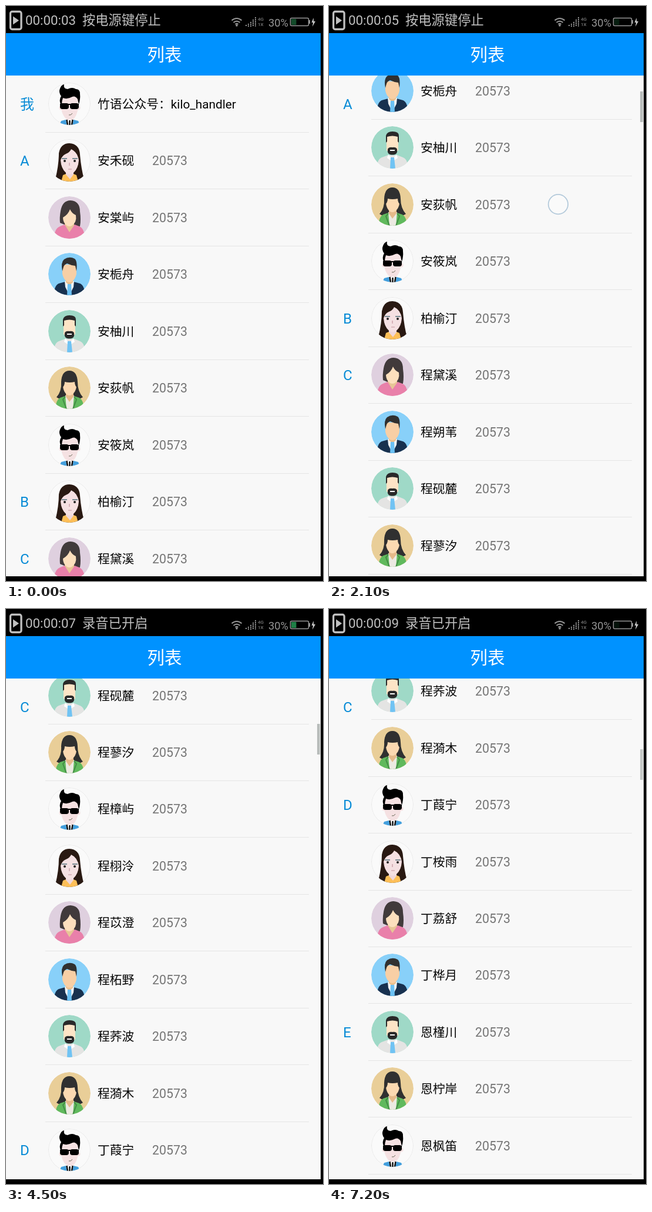
These frames come from a looping animation (540x976 px, 7.5 s). An HTML page:

```html
<!DOCTYPE html>
<html lang="zh-CN">
<head>
<meta charset="utf-8">
<title>列表</title>
<style>
  html, body { margin: 0; width: 100%; height: 100%; overflow: hidden; background: #000; }
  svg { display: block; width: 100vw; height: 100vh; }
  text { font-family: Roboto, "Noto Sans CJK SC", "Noto Sans CJK", sans-serif; }
  .name { font-size: 20.8px; fill: #060606; }
  .phone { font-size: 21.3px; fill: #757575; }
  .letter { font-size: 24px; fill: #078bd6; }
  .status { font-size: 22.3px; fill: #c0c0c0; }
</style>
</head>
<body>
<svg viewBox="0 0 540 976" xmlns="http://www.w3.org/2000/svg">
  <defs>
    <clipPath id="round"><circle r="36"/></clipPath>
    <clipPath id="view"><rect y="118" width="536" height="850"/></clipPath>

    <g id="face0">
      <circle r="35.5" fill="#fafafa" stroke="#e9e9e9"/>
      <path d="M-14 -14H15V6Q13 21 6 27Q1 31 -4 27Q-13 20 -14 6Z" fill="#f5e1e2"/>
      <circle cx="-14" cy="7" r="3.5" fill="#f5e1e2"/><circle cx="15" cy="7" r="3.5" fill="#f5e1e2"/>
      <path d="M-15 1Q-18 -7 -14 -13Q-19 -20 -16 -26Q-14 -32 -9 -33Q-11 -26 -3 -25Q5 -29 11 -25Q18 -25 18 -17Q19 -8 16 1L14 -8Q10 -14 5 -12Q-4 -7 -11 -10Q-13 -5 -13 1Z"/>
      <rect x="-16" y="-1" width="15" height="10" rx="4"/><rect x="1" y="-1" width="15" height="10" rx="4"/>
      <path d="M-16 1H16" stroke="#000" stroke-width="2"/>
      <path d="M-1 19Q3 20 5 16" fill="none" stroke="#665" stroke-width="1"/>
      <path d="M-17 36L-14 29L-6 27H7L15 29L18 36Z" fill="#439fdd"/>
      <path d="M-6 27H7L5 36H-4Z" fill="#fff"/>
      <path d="M-4.500 27L-3 36M5.500 27L4 36M.5 28V36" stroke="#111" stroke-width="2.500"/>
    </g>
    <g id="face1">
      <circle r="35.5" fill="#fafafa" stroke="#e9e9e9"/>
      <path d="M-24 32Q-18 8 -18 -12Q-15 -29 0 -29Q17 -28 18 -10Q20 14 25 32Q14 36 0 36Q-14 36 -24 32Z" fill="#291912"/>
      <path d="M-14 36L-11 25L-6 23H7L12 25L15 36Z" fill="#fdbf58"/>
      <path d="M-6 18H7V24L1 32L-6 24Z" fill="#efd7da"/>
      <path d="M-15 0Q-13 -8 -6 -11Q1 -14 3 -19Q14 -14 16 0Q15 14 7 21Q1 26 -6 21Q-14 14 -15 0Z" fill="#f5e0e2"/>
      <path d="M-13 -3H-4M5 -3H14" stroke="#53727b" stroke-width="1.6"/>
      <circle cx="-8" cy="1" r="2" fill="#222"/><circle cx="9" cy="1" r="2" fill="#222"/>
      <path d="M0 4V9M-2 15H4" fill="none" stroke="#c4959e" stroke-width="1.2"/>
    </g>
    <g id="face2">
      <circle r="36" fill="#dfd0df"/>
      <path d="M-16 9Q-17 0 -15 -11Q-12 -29 2 -29Q18 -28 18 -10Q20 4 18 15Q8 18 0 14Q-8 13 -16 9Z" fill="#413a3b"/>
      <path d="M-7 9H7L9 14L0 27L-9 14Z" fill="#e7c596"/>
      <path d="M-11 0Q-2 -5 1 -14Q4 -7 11 -4Q13 8 4 14Q0 16 -4 14Q-11 9 -11 0Z" fill="#fcdfbd"/>
      <path d="M-26 36Q-26 19 -16 15L-8 12L0 25L9 12L17 15Q26 19 26 36Z" fill="#e980aa"/>
    </g>
    <g id="face3">
      <circle r="36" fill="#88d0f9"/>
      <path d="M-26 36Q-26 19 -18 16L-7 13H7L18 16Q26 19 26 36Z" fill="#18314f"/>
      <path d="M-8 12H8L7 22L0 36L-7 22Z" fill="#f2f4f5"/>
      <path d="M-6 7H6V14L0 19L-6 14Z" fill="#eabf8d"/>
      <path d="M-3 17H3L4 36H-4Z" fill="#6bc1f4"/>
      <path d="M-12 -16H12V0Q10 9 4 13Q0 15 -4 13Q-10 9 -12 0Z" fill="#f8cfa5"/>
      <path d="M-12 -5Q-15 -20 -9 -25Q0 -31 9 -26Q14 -22 12 -5L10 -14Q2 -15 -4 -18Q-9 -16 -10 -12Z" fill="#303030"/>
    </g>
    <g id="face4">
      <circle r="36" fill="#9fd9c7"/>
      <path d="M-27 36Q-26 20 -18 17L-7 13H8L18 17Q26 20 27 36Z" fill="#e4e4e3"/>
      <path d="M-7 12L0 20L7 12L9 18L3 22H-3L-9 18Z" fill="#fff"/>
      <path d="M-3 17H3L5 36H-4Z" fill="#70c3f3"/>
      <path d="M-10 -22H10V5Q0 14 -10 5Z" fill="#fde4c6"/>
      <path d="M-11 -8V-20Q-9 -27 0 -27Q11 -27 11 -20V-8L9 -10V-18Q0 -21 -9 -18V-10Z" fill="#292929"/>
      <path d="M-8 3Q-6 -1 0 0Q6 -1 8 3Q9 11 4 12Q0 13 -4 12Q-9 11 -8 3Z" fill="#292929"/>
      <path d="M-4 4H4V6H-4Z" fill="#fff"/>
    </g>
    <g id="face5">
      <circle r="36" fill="#e9ce98"/>
      <path d="M-22 16Q-13 6 -14 -10Q-13 -29 0 -29Q13 -29 14 -10Q14 6 23 16Q16 21 8 18H-8Q-16 21 -22 16Z" fill="#303030"/>
      <path d="M-24 36Q-23 21 -16 17L-7 14H8L17 17Q24 21 25 36Z" fill="#60b95d"/>
      <path d="M-7 13H8L6 36H-5Z" fill="#eceae2"/>
      <path d="M-7 15L-11 20L-5 36M8 15L12 20L6 36" fill="none" stroke="#438c46" stroke-width="2"/>
      <path d="M-6 6H7V15L0 24L-6 15Z" fill="#e6ba8a"/>
      <path d="M-11 -12H12V-2Q11 7 4 12Q0 14 -4 12Q-10 7 -11 -2Z" fill="#fbd9b1"/>
      <path d="M-12 0V-14L0 -20L13 -14V0Q9 -4 9 -10Q0 -8 -8 -10Q-8 -4 -12 0Z" fill="#303030"/>
    </g>
  </defs>

  <rect width="540" height="976"/>
  <rect y="46" width="536" height="922" fill="#f8f8f8"/>
  <g clip-path="url(#view)">
    <g id="rows"></g>
    <rect y="118" width="72" height="95" fill="#f8f8f8"/>
    <g id="letters"></g>
    <rect id="bar" x="530" width="5" height="52" fill="#b9bdbb"/>
  </g>
  <circle id="touch" r="16.7" fill="#fff" fill-opacity=".3" stroke="#b4cadb" stroke-width="1.8"/>

  <rect y="46" width="536" height="72" fill="#0092ff"/>
  <text x="270" y="93" text-anchor="middle" font-size="29.5" font-weight="300" fill="#fff">列表</text>

  <rect x="7.5" y="9.5" width="18.5" height="30" rx="3" fill="none" stroke="#c0c0c0" stroke-width="3.3"/>
  <path d="M12 17.5L22 24.5L12 31.5Z" fill="#c0c0c0"/>
  <text id="clock" class="status" x="33" y="32"></text>
  <text id="notice" class="status" x="130" y="32"></text>

  <g fill="none" stroke="#969696" stroke-width="2">
    <path d="M384.5 24.5Q393 17.5 401.5 24.5M387.5 28Q393 23.5 398.5 28M390.5 31Q393 29 395.5 31"/>
    <path d="M409 32V35M413 30V35M417 27V35M421 23V35M425 19V35" stroke-dasharray="2 1"/>
    <rect x="484.5" y="20.5" width="31" height="13" rx="2" stroke-width="1.5"/>
  </g>
  <g fill="#969696">
    <circle cx="393" cy="33" r="1.8"/>
    <text x="429" y="25" font-size="8">4G</text>
    <text x="429" y="34" font-size="8">1X</text>
    <text x="447" y="34.5" font-size="18.3">30%</text>
    <rect x="516" y="24" width="2" height="6"/>
    <path d="M524 20L520.5 28H523L522 35L527 26H524Z" fill="#c8c8c8"/>
  </g>
  <rect id="charge" x="486" y="22" width="8.5" height="10" fill="#249452"/>
</svg>
<script>
const $ = id => document.getElementById(id);
const LOOP = 7500, STEP = 300, PITCH = 96.45, TOP = 166;

const groups = [
  ['我', '竹语公众号：kilo_handler'],
  ['A', '安禾砚 安棠屿 安栀舟 安柚川 安荻帆 安筱岚'],
  ['B', '柏榆汀'],
  ['C', '程黛溪 程朔苇 程砚麓 程蓼汐 程樟屿 程栩泠 程苡澄 程柘野 程荞波 程漪木'],
  ['D', '丁葭宁 丁桉雨 丁荔舒 丁桦月'],
  ['E', '恩槿川 恩柠岸 恩枫笛']
];

// Keys are [step, value], joined by straight lines.
const scrollKeys = [[0, 0], [1, 16], [2, 37], [3, 101], [4, 171], [9, 405], [10, 415],
  [11, 570], [12, 791], [13, 892], [14, 952], [15, 984], [16, 1000], [17, 1122],
  [18, 1242], [21, 1479], [22, 1545], [23, 1569], [24, 1570]];
const chargeKeys = [[0, .5], [4, .2], [9, .2], [11, .8], [18, .9], [21, .12], [24, .12]];
const ticks = [1, 5, 10, 14, 18, 23];

// Each drag: first and last step, position keys, opacity at its end.
const drags = [
  { from: 1, to: 9, x: [[1, 322], [4, 355], [9, 414]], y: [[1, 635], [2, 614], [4, 480], [9, 241]], fade: 1 },
  { from: 11, to: 13, x: [[11, 325], [13, 363]], y: [[11, 620], [13, 376]], fade: .3 },
  { from: 16, to: 21, x: [[16, 290], [18, 341], [21, 412]], y: [[16, 684], [18, 442], [21, 212]], fade: 1 }
];

function track(keys, k) {
  const i = keys.findIndex(key => key[0] >= k);
  if (i < 0) return keys[keys.length - 1][1];
  if (i === 0) return keys[0][1];
  const [a, u] = keys[i - 1], [b, v] = keys[i];
  return u + (v - u) * (k - a) / (b - a);
}

const rows = [], letters = [];
for (const [letter, names] of groups) {
  const first = rows.length;
  for (const name of names.split(' ')) {
    const g = document.createElementNS('http://www.w3.org/2000/svg', 'g');
    const phone = first ? '<text class="phone" x="249" y="7.5">20573</text>' : '';
    g.innerHTML = `<use href="#face${rows.length % 6}" x="108"/>
      <text class="name" x="156" y="7.5">${name}</text>${phone}
      <rect x="67" y="48" width="449" height="1" fill="#e5e5e5"/>`;
    $('rows').append(g);
    rows.push(g);
  }
  const label = document.createElementNS('http://www.w3.org/2000/svg', 'text');
  label.setAttribute('class', 'letter');
  label.setAttribute('x', 24);
  label.textContent = letter;
  $('letters').append(label);
  letters.push({ label, first, last: rows.length - 1 });
}
for (let i = 0; i < 6; i++) $('face' + i).setAttribute('clip-path', 'url(#round)');

function draw(now) {
  const k = Math.floor(now % LOOP / STEP);
  const scroll = track(scrollKeys, k);
  const rowY = i => Math.round(TOP + PITCH * i - scroll);

  rows.forEach((g, i) => g.setAttribute('transform', `translate(0 ${rowY(i)})`));
  // A letter sticks to the top until the last row of its group pushes it out.
  for (const { label, first, last } of letters)
    label.setAttribute('y', Math.min(Math.max(TOP, rowY(first)), rowY(last)) + 8.5);

  $('bar').setAttribute('y', Math.round(122.4 + .0735 * scroll));
  $('bar').setAttribute('opacity', k === 0 ? 0 : k > 22 ? .8 : 1);

  const drag = drags.find(d => k >= d.from && k <= d.to);
  $('touch').setAttribute('opacity', !drag ? 0 : k === drag.to ? drag.fade : 1);
  if (drag) {
    $('touch').setAttribute('cx', track(drag.x, k));
    $('touch').setAttribute('cy', track(drag.y, k));
  }

  $('clock').textContent = '00:00:0' + (3 + ticks.filter(n => n <= k).length);
  $('notice').textContent = k < 10 ? '按电源键停止' : '录音已开启';
  $('charge').setAttribute('opacity', track(chargeKeys, k));
  requestAnimationFrame(draw);
}
draw(0);
</script>
</body>
</html>
```
